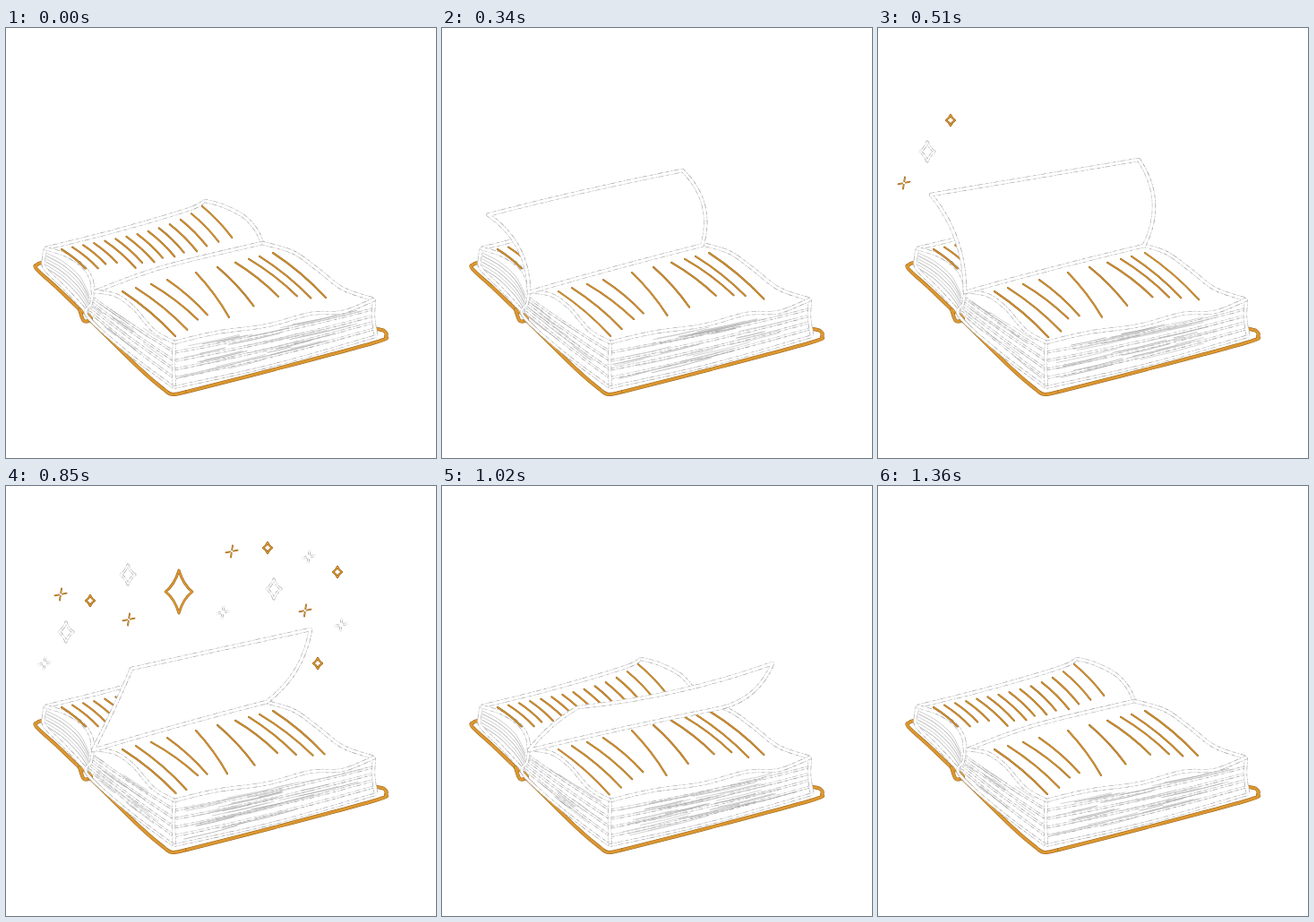
Recreate the animation shown at these times as an HTML page with a canvas. Size 480x480 px, loop 1530 ms.

```html
<!DOCTYPE html>
<html lang="en">
<head>
<meta charset="utf-8">
<title>Magic book</title>
<style>
  html, body { margin: 0; width: 100%; height: 100%; overflow: hidden; background: #fff; }
  canvas { display: block; }
</style>
</head>
<body>
<canvas id="stage" width="480" height="480"></canvas>
<script>
const ctx = document.getElementById('stage').getContext('2d');
const STEP = 170, STEPS = 9, POSES = 8;
const GOLD = '#dc9730', BROWN = '#8f5f1a', GREY = '#a2a2a2', PALE = '#c2c2c2';
ctx.lineJoin = 'round';

function random(seed) {
  let s = seed * 7919 + 17;
  return () => (s = (s * 16807) % 2147483647) / 2147483647;
}
const mix = (a, b, t) => a + (b - a) * t;

// Smooth curve through x,y pairs.
function curve(p) {
  const path = new Path2D(), n = p.length / 2;
  const at = i => { i = Math.max(0, Math.min(n - 1, i)); return [p[2 * i], p[2 * i + 1]]; };
  path.moveTo(p[0], p[1]);
  for (let i = 0; i < n - 1; i++) {
    const a = at(i - 1), b = at(i), c = at(i + 1), d = at(i + 2);
    path.bezierCurveTo(b[0] + (c[0] - a[0]) / 6, b[1] + (c[1] - a[1]) / 6,
      c[0] - (d[0] - b[0]) / 6, c[1] - (d[1] - b[1]) / 6, c[0], c[1]);
  }
  return path;
}
// Continues a path from a to b; bend is the bulge relative to the length.
function arcTo(path, a, b, bend) {
  const dx = b[0] - a[0], dy = b[1] - a[1];
  path.quadraticCurveTo((a[0] + b[0]) / 2 - dy * bend, (a[1] + b[1]) / 2 + dx * bend, b[0], b[1]);
}
function arc(a, b, bend) {
  const path = new Path2D();
  path.moveTo(...a);
  arcTo(path, a, b, bend);
  return path;
}

function stroke(path, color, width) {
  ctx.strokeStyle = color;
  ctx.lineWidth = width;
  ctx.stroke(path);
}
// White line with a pale, broken rim.
function chalk(path, width = 4.2) {
  ctx.lineCap = 'butt';
  stroke(path, '#dedede', width);
  ctx.setLineDash([3, 3, 1, 2, 5, 4]);
  stroke(path, GREY, width);
  ctx.setLineDash([]);
  stroke(path, '#fff', width - 1.2);
}
function ink(path, width) {
  ctx.lineCap = 'round';
  stroke(path, BROWN, width);
  stroke(path, GOLD, width - 0.9);
}

const COVER = [
  [40, 262, 35, 264, 34, 269, 58, 291, 82, 314],
  [82, 314, 87, 327, 95, 324, 84, 315],
  [93, 325, 150, 381, 177, 404, 186, 409, 202, 406],
  [202, 406, 300, 381, 412, 351, 424, 344, 422, 338, 414, 336]
];
const PAGES = [
  [44, 246, 120, 227, 202, 203, 222, 193],
  [222, 193, 241, 198, 265, 210, 279, 225, 286, 240],
  [286, 240, 175, 267, 97, 295],
  [97, 295, 95, 280, 85, 265, 66, 253, 44, 246],
  [286, 240, 320, 250, 346, 268, 376, 291, 411, 303],
  [411, 303, 376, 317, 340, 319, 292, 332, 235, 340, 188, 351],
  [188, 351, 165, 338, 142, 312, 122, 298, 98, 294]
];

function leftText(rnd) {
  const lines = [];
  for (let i = 0; i < 14; i++) {
    const u = i / 13, x = 62 + 157 * u, y = 247 - 30 * u - 18 * u ** 5;
    const reach = mix(24, 33, rnd()) + 5 * u;
    lines.push([x, y, x + reach, y + reach * mix(0.8, 1.05, u)]);
  }
  return lines;
}
function rightText(rnd, wobble) {
  return [130, 145, 162, 180, 212, 236, 256, 271, 283, 298].map(x => {
    const u = (x - 130) / 168, y = 294 - 43 * u, turn = 2 * Math.PI * u;
    return [x, y, x + 48 + 11 * Math.cos(turn) + wobble * (rnd() - 0.5),
      y + 44 + 6 * Math.cos(2 * turn) + wobble * (rnd() - 0.5)];
  });
}
const write = lines => lines.forEach(([x1, y1, x2, y2]) =>
  ink(arc([x1, y1], [x2, y2], -0.06), 2.1));

// One side of the paper block: a few sheets and loose scribbles between its two long edges.
function paper(rnd, [top1, top2, low1, low2], sheets, scribbles) {
  const at = (u, v) => [0, 1].map(k =>
    mix(mix(top1[k], top2[k], u), mix(low1[k], low2[k], u), v));
  for (let k = 1; k < sheets; k++)
    chalk(arc(at(0, k / sheets), at(1, k / sheets), 0.02), 2.8);
  for (let k = 0; k < scribbles; k++) {
    const u = rnd() * 0.65, v = mix(0.1, 0.93, rnd()), length = mix(0.12, 0.34, rnd());
    stroke(arc(at(u, v), at(u + length, v), 0.02), k % 3 ? PALE : GREY, 0.7);
  }
}

function book(rnd, wobble) {
  COVER.forEach(part => ink(curve(part), 4));
  for (let k = 0; k < 6; k++)
    stroke(curve([45, 251 + k * 3.4, 64, 261 + k * 4, 82, 277 + k * 4.5, 93, 298 + k * 3.6]),
      k % 2 ? GREY : PALE, 0.8);
  paper(rnd, [[98, 296], [188, 352], [92, 322], [187, 400]], 5, 16);
  paper(rnd, [[190, 352], [411, 306], [189, 400], [412, 343]], 5, 36);
  chalk(curve([44, 246, 42, 258, 44, 269, 66, 291, 91, 318]));
  chalk(curve([97, 295, 95, 308, 91, 322, 135, 362, 187, 401]), 3.4);
  chalk(curve([188, 351, 187, 376, 188, 401]));
  chalk(curve([411, 303, 410, 322, 413, 344]));
  chalk(curve([188, 401, 300, 376, 413, 344]), 3.4);
  PAGES.forEach(edge => chalk(curve(edge)));
  write(leftText(random(5)));
  write(rightText(rnd, wobble));
}

// Turning page: corners at the front, the far side and the hinge, with bends of three edges.
const HINGE = [97, 295];
const TURN = [
  { pose: 1, front: [44, 231], far: [246, 171], hinge: [284, 242], bends: [0.34, -0.03, -0.3] },
  { pose: 3, front: [59, 186], far: [291, 147], hinge: [297, 243], bends: [0.18, 0, -0.29] },
  { pose: 5, front: [140, 204], far: [340, 160], hinge: [291, 241], bends: [0.02, 0, -0.2] },
  { pose: 6, front: [152, 247], far: [369, 198], hinge: [310, 248], bends: [-0.1, 0.06, -0.26] },
  { pose: 7, front: [172, 297], far: [399, 250], hinge: [287, 240], bends: [-0.25, 0.03, -0.07] }
];
function turningPage(pose) {
  const next = TURN.findIndex(key => key.pose >= pose);
  const b = TURN[next], a = TURN[Math.max(0, next - 1)];
  const t = a === b ? 0 : (pose - a.pose) / (b.pose - a.pose);
  const blend = name => a[name].map((value, i) => mix(value, b[name][i], t));
  const front = blend('front'), far = blend('far'), hinge = blend('hinge'), bends = blend('bends');
  const outline = arc(HINGE, front, bends[0]);
  arcTo(outline, front, far, bends[1]);
  arcTo(outline, far, hinge, bends[2]);
  arcTo(outline, hinge, HINGE, 0.01);
  outline.closePath();
  ctx.fillStyle = '#fff';
  ctx.fill(outline);
  chalk(outline);
}

function star(x, y, w, h) {
  const path = new Path2D(), k = 0.32;
  path.moveTo(x, y - h);
  for (const [dx, dy] of [[1, 0], [0, 1], [-1, 0], [0, -1]])
    path.quadraticCurveTo(x + (dx + dy) * w * k, y + (dy - dx) * h * k, x + dx * w, y + dy * h);
  path.closePath();
  return path;
}
function cross(x, y, r) {
  const path = new Path2D();
  for (const [dx, dy] of [[0.15, -1], [1, -0.2], [-0.15, 1], [-1, 0.2]]) {
    path.moveTo(x + dx * r * 0.3, y + dy * r * 0.3);
    path.lineTo(x + dx * r, y + dy * r);
  }
  return path;
}
const SPARK = {
  big: (x, y) => ink(star(x, y, 15, 24), 2.8),
  gold: (x, y) => ink(star(x, y, 5, 6), 2.2),
  white: (x, y) => chalk(star(x, y, 8, 11), 2.8),
  ticks: (x, y) => ink(cross(x, y, 6.5), 1.8),
  plus: (x, y) => chalk(cross(x, y, 7.5), 2.6)
};
const SKY = {
  big: [[193, 118]],
  gold: [[94, 128], [292, 69], [370, 96], [348, 198]],
  white: [[136, 99], [299, 115], [67, 163]],
  ticks: [[61, 121], [252, 73], [137, 149], [334, 139]],
  plus: [[338, 79], [242, 141], [43, 198], [374, 155]]
};
function sparks(pose) {
  if (pose === 3)
    ['gold', 'white', 'ticks'].forEach((kind, i) => SPARK[kind](81 - 26 * i, 103 + 35 * i));
  if (pose === 4 || pose === 5) {
    const rest = 5 - pose;
    for (const kind in SKY)
      SKY[kind].forEach(([x, y]) => SPARK[kind](x - 8 * rest, y - 13 * rest));
  }
}

function draw(step) {
  const pose = step % POSES;
  ctx.fillStyle = '#fff';
  ctx.fillRect(0, 0, 480, 480);
  book(random(pose + 3), pose ? 5 : 0);
  if (pose) turningPage(pose);
  sparks(pose);
}

let shown = -1;
function tick() {
  const step = Math.floor(performance.now() / STEP) % STEPS;
  if (step !== shown) draw(shown = step);
  requestAnimationFrame(tick);
}
tick();
</script>
</body>
</html>
```
